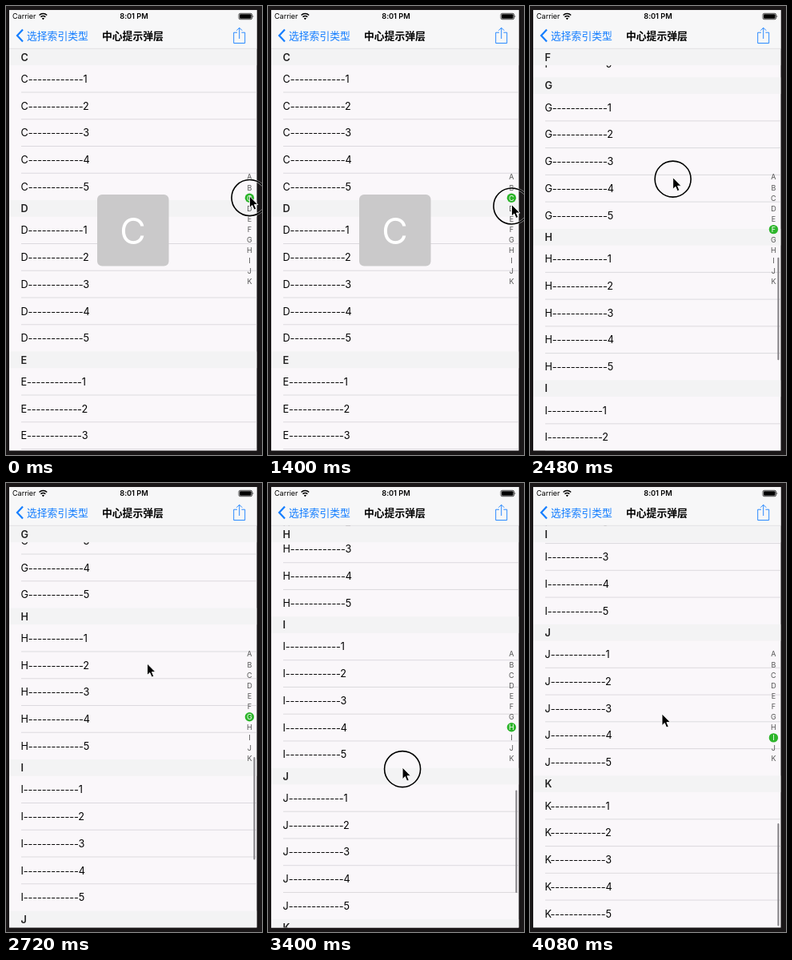
Write an HTML page that moves like this. It is 320 px wide and 562 px high and loops after 4120 ms.

```html
<!DOCTYPE html>
<html lang="zh">
<head>
<meta charset="utf-8">
<style>
html, body { margin: 0; width: 100%; height: 100%; overflow: hidden; background: #1a1718; }
svg { display: block; width: 100vw; height: 100vh; }
text { font-family: Inter, Roboto, "Liberation Sans", sans-serif; font-feature-settings: "calt" 0; }
.cjk { font: 12.8px "Noto Sans CJK SC", "Noto Sans CJK", sans-serif; }
.row { font-size: 12.7px; letter-spacing: -.1px; }
.head { font-size: 12.7px; font-weight: 600; fill: #222; }
.index { font-size: 9px; text-anchor: middle; }
</style>
</head>
<body>
<svg viewBox="0 0 320 562">
  <defs><clipPath id="listClip"><rect x="4" y="53.5" width="309.5" height="503"/></clipPath></defs>
  <rect width="320" height="562" fill="#1a1718"/>
  <rect x="4" y="5" width="309.5" height="551.5" fill="#faf7fa"/>
  <g clip-path="url(#listClip)"><g id="rows"></g><g id="heads"></g></g>
  <rect id="bar" x="309.4" width="2" height="128.5" rx="1" fill="#858387"/>

  <rect x="4" y="5" width="309.5" height="48.5" fill="#f7f7f8"/>
  <path d="M4 53.3H313.5" stroke="#c8c7cc" stroke-width=".5"/>
  <text x="8" y="16.2" font-size="9">Carrier</text>
  <g fill="none" stroke="#000" stroke-width="1.5">
    <path d="M41.6 11.6a6.6 6.6 0 0 1 9.6 0M43.5 13.7a4 4 0 0 1 5.8 0"/>
  </g>
  <path d="M46.4 17.2l-1.6-1.8a2.3 2.3 0 0 1 3.2 0z"/>
  <text x="160" y="16.2" font-size="9.2" font-weight="600" text-anchor="middle">8:01 PM</text>
  <rect x="291" y="9.3" width="16.6" height="7.4" rx="1.8" fill="none" stroke="#000" stroke-width=".7"/>
  <rect x="292" y="10.3" width="14.6" height="5.4" rx="1"/>
  <path d="M308.6 11.6q1.6 1.4 0 2.8z"/>
  <g fill="none" stroke="#147eff">
    <path d="M21 29.5L14 37l7 7.5" stroke-width="2.2"/>
    <path d="M289 33.2h-4.3v13.3h14v-13.3h-4.3M291.7 41V27.3M288.2 30.7l3.5-3.5 3.5 3.5" stroke-width=".9"/>
  </g>
  <text class="cjk" x="26" y="41.6" fill="#147eff">选择索引类型</text>
  <text class="cjk" x="120" y="41.6" style="font-weight:700">中心提示弹层</text>

  <circle id="dot" cx="304.4" r="5.7" fill="#2db52b"/>
  <g id="index"></g>
  <g id="popup">
    <rect x="114" y="236" width="89.5" height="89.5" rx="6" fill="#cac9ca"/>
    <text id="popupText" x="158.6" y="297.5" font-size="44.5" text-anchor="middle" fill="#fff"></text>
  </g>
  <g id="cursor">
    <g id="ring" fill="none">
      <circle cy="2" r="22.5" stroke="#fff" stroke-opacity=".5" stroke-width="3"/>
      <circle cy="2" r="22.5" stroke="#000" stroke-width="1.6"/>
    </g>
    <path d="M0 0V14.6L3.3 11.5 5.6 17 8.2 15.9 5.9 10.6H10.4Z" stroke="#fff" stroke-width=".9"/>
  </g>
</svg>
<script>
const LOOP = 4120;
const TOP = 53.5, HEAD = 20.75, ROW = 33.75, SECTION = HEAD + 5 * ROW;
const MAX_SCROLL = 11 * SECTION - 503;
const letters = [..."ABCDEFGHIJK"];
const $ = id => document.getElementById(id);
const clamp = (v, lo, hi) => Math.min(hi, Math.max(lo, v));

function add(parent, tag, attrs, text) {
  const el = document.createElementNS("http://www.w3.org/2000/svg", tag);
  for (const key in attrs) el.setAttribute(key, attrs[key]);
  if (text) el.textContent = text;
  parent.append(el);
  return el;
}
const move = (el, x, y) => el.setAttribute("transform", `translate(${x} ${y})`);

const indexY = i => 214.2 + 13.1 * i;
const heads = [], labels = [];
letters.forEach((letter, s) => {
  for (let r = 0; r < 5; r++) {
    const y = s * SECTION + HEAD + r * ROW;
    add($("rows"), "text", { class: "row", x: 18.5, y: y + 21.5 }, `${letter}------------${r + 1}`);
    if (r) add($("rows"), "path", { d: `M19 ${y}H313.5`, stroke: "#c8c7cc", "stroke-width": .6 });
  }
  const head = add($("heads"), "g", {});
  add(head, "rect", { x: 4, width: 309.5, height: HEAD, fill: "#f3f3f4" });
  add(head, "text", { class: "head", x: 18.5, y: 15.1 }, letter);
  heads.push(head);
  labels.push(add($("index"), "text", { class: "index", x: 304.4, y: indexY(s) + 3.2 }, letter));
});

// Pointer path: time, x, y
const path = [
  [0, 304.5, 238], [520, 304.5, 318], [600, 304.5, 316], [760, 304.5, 263],
  [900, 304.5, 222], [1080, 304.5, 213], [1160, 304.5, 213], [1600, 304.5, 278],
  [1680, 296, 288], [1720, 296, 288], [1840, 189, 398], [1960, 189, 398],
  [2120, 189, 374], [2180, 188, 374], [2500, 178, 204], [2720, 176.5, 226],
  [3160, 176.5, 273], [3300, 170, 398], [3560, 165, 289], [LOOP, 165, 289]
];
function pointer(t) {
  const k = Math.max(1, path.findIndex(p => p[0] >= t));
  const [t0, x0, y0] = path[k - 1], [t1, x1, y1] = path[k];
  const u = (t - t0) / (t1 - t0);
  return [x0 + (x1 - x0) * u, y0 + (y1 - y0) * u];
}

// The list follows the finger on the index with a short lag.
function touched(t) {
  const y = pointer(clamp(t - 40, 0, 1600))[1] + 2;
  return clamp(Math.round((y - 214) / 13.1), 0, 8);
}

const glide = (start, distance, dt) => start + distance * (1 - Math.exp(-dt / 500));
function scrollAt(t) {
  if (t < 2180) return touched(t) * SECTION;
  if (t < 2500) return 5 * SECTION + 166 * ((t - 2180) / 320) ** 1.2;
  if (t < 3300) return glide(1113.5, 309, t - 2500);
  if (t < 3560) return 1360 + 110 * (t - 3300) / 260;
  const s = glide(1470, 203.4, t - 3560);
  if (s < MAX_SCROLL) return s;
  const over = Math.max(0, t - 3957);
  return MAX_SCROLL + .18 * over * Math.exp(-over / 35);
}
const activeAt = t => t < 2180 ? touched(t) : Math.floor(scrollAt(t) / SECTION + 1e-6);

function render(t) {
  const scroll = scrollAt(t), active = activeAt(t), previous = activeAt(Math.max(0, t - 40));
  move($("rows"), 0, TOP - scroll);
  heads.forEach((head, s) => {
    const y = TOP + s * SECTION - scroll;
    move(head, 0, Math.max(y, Math.min(TOP, y + SECTION - HEAD)));
  });
  labels.forEach((label, i) =>
    label.setAttribute("fill", i === active ? "#fff" : i === previous ? "#c4c2c4" : "#555"));
  $("dot").setAttribute("cy", indexY(active) - .1);

  $("popupText").textContent = letters[active];
  $("popup").setAttribute("opacity", clamp((1840 - t) / 200, 0, 1));

  $("bar").setAttribute("y", 343 + (scroll - 1223.4) * .2315);
  $("bar").setAttribute("opacity", t < 2180 ? 0 : 1);

  move($("cursor"), ...pointer(t));
  const pressed = t < 1620 || (t >= 2160 && t < 2500) || (t >= 3290 && t < 3560);
  $("ring").setAttribute("opacity", pressed ? 1 : 0);
}

const start = performance.now();
function frame() {
  const t = (performance.now() - start) % LOOP;
  render(Math.floor(t / 40) * 40);
  requestAnimationFrame(frame);
}
frame();
</script>
</body>
</html>
```
